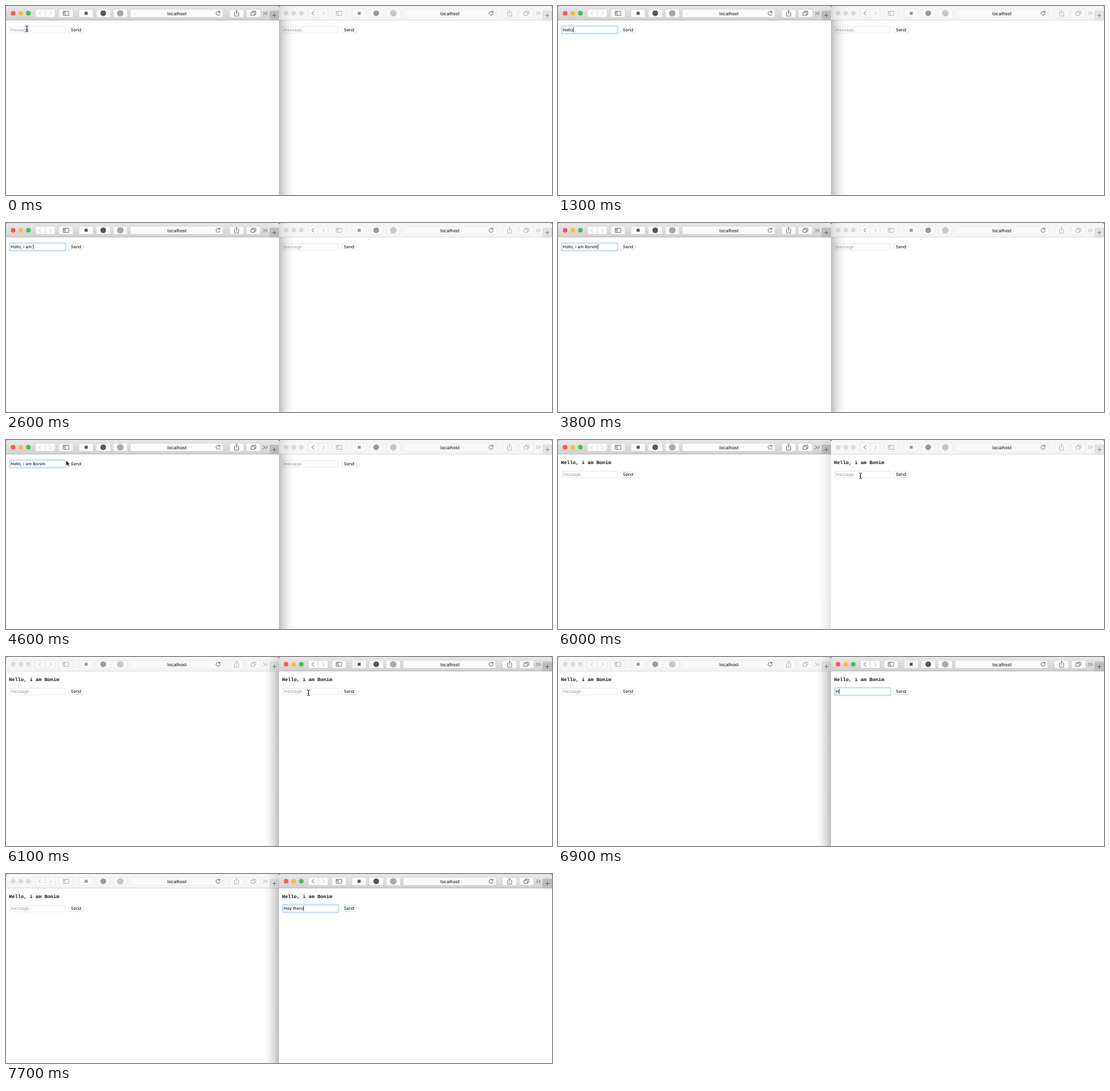
Recreate the animation shown at these times as an HTML page. Size 880 by 306 pixels, loop 8 s.

```html
<!DOCTYPE html>
<html lang="en">
<head>
<meta charset="utf-8">
<title>Two chat windows</title>
<style>
html, body { margin: 0; width: 100%; height: 100%; overflow: hidden; background: #fff; }
svg { display: block; width: 880px; height: 306px; }
text { font-family: Inter, "Liberation Sans", sans-serif; white-space: pre; text-rendering: geometricPrecision; }
.win {
  --bar: #f6f6f6; --edge: #d3d3d3; --btn: #f9f9f9; --rim: #e6e6e6; --icon: #a9a9a9;
  --off: #b9b9b9; --mark: #999; --soft: #c9c9c9; --tab: #e3e3e3; --plus: #777;
  --red: #dcdcdc; --amber: #dcdcdc; --green: #dcdcdc;
}
.win.active {
  --bar: url(#bar); --edge: #b4b4b4; --btn: #fbfbfb; --rim: #cfcfcf; --icon: #555;
  --off: #c3c3c3; --mark: #555; --soft: #a8a8a8; --tab: #bcbcbc; --plus: #555;
  --red: #fc5b57; --amber: #fdbc40; --green: #34c84a;
}
.btn { fill: var(--btn); stroke: var(--rim); stroke-width: .7; }
.icon { fill: none; stroke: var(--icon); stroke-width: .8; }
.dark { fill: none; stroke: #555; stroke-width: .9; }
.off { fill: none; stroke: var(--off); stroke-width: .9; }
.hint { fill: #9c9c9c; }
.log { font: bold 7.95px "Liberation Mono", monospace; fill: #111; }
</style>
</head>
<body>
<svg viewBox="0 0 880 306">
  <defs>
    <linearGradient id="bar" x2="0" y2="1">
      <stop stop-color="#e9e7e9"/><stop offset="1" stop-color="#d2d0d2"/>
    </linearGradient>
    <linearGradient id="shade">
      <stop stop-opacity=".26"/><stop offset=".3" stop-opacity=".14"/>
      <stop offset=".65" stop-opacity=".04"/><stop offset="1" stop-opacity="0"/>
    </linearGradient>
    <g id="cast">
      <rect width="25" height="23" fill="url(#shade)" opacity=".45"/>
      <rect y="23" width="25" height="283" fill="url(#shade)"/>
    </g>
    <path id="beamLine" d="M-2.2-4.6Q0-4.6 0-3.2Q0-4.6 2.2-4.6M0-3.4V3.4M-2.2 4.6Q0 4.6 0 3.2Q0 4.6 2.2 4.6M-1.2 1.2H1.2"/>
  </defs>
  <g id="stage"></g>
  <use id="castRight" href="#cast" x="440"/>
  <use id="castLeft" href="#cast" transform="translate(440 0) scale(-1 1)"/>
  <path id="arrow" d="M0 0V8.8L2 7 3.4 10 4.9 9.3 3.6 6.4H6.2Z" stroke="#fff" stroke-width=".7"/>
  <g id="beam" fill="none">
    <use href="#beamLine" stroke="#fff" stroke-width="2"/>
    <use href="#beamLine" stroke="#111"/>
  </g>
</svg>
<script>
const LOOP = 8000;
const GREETING = 'Hello, i am Bonim';
const REPLY = 'Hey there';
const $ = id => document.getElementById(id);

const button = (x, w) => `<rect class="btn" x="${x}" y="5.2" width="${w}" height="13.2" rx="2"/>`;
const light = (x, name) => `<circle cx="${x}" cy="11.7" r="3.75" style="fill:var(--${name})"/>`;

function windowMarkup(id, x, back, forward) {
  return `<g id="${id}" class="win" transform="translate(${x} 0)">
    <rect width="440" height="306" fill="#fff"/>
    <rect width="440" height="23" fill="#444"/>
    <path d="M0 23V2Q0 0 2 0H438Q440 0 440 2V23Z" style="fill:var(--bar)"/>
    <rect y="22.4" width="440" height=".8" style="fill:var(--edge)"/>
    ${light(11.5, 'red')}${light(23.8, 'amber')}${light(36, 'green')}
    ${button(47.4, 31.8)}
    <path class="btn" d="M63.4 5.2V18.4"/>
    <path class="${back}" d="M56.4 8.4L53 11.8L56.4 15.2"/>
    <path class="${forward}" d="M70 8.4L73.4 11.8L70 15.2"/>
    ${[85, 117.6, 145.3, 172.7, 360.2, 387.3].map(b => button(b, 23)).join('')}
    <path class="icon" d="M92.2 8.5H101V15.2H92.2ZM95.2 8.5V15.2M93 10.3H94.4M93 11.8H94.4"/>
    <rect x="126.8" y="9.4" width="4.8" height="4.8" style="fill:var(--mark)"/>
    <circle cx="156.7" cy="11.8" r="4.6" style="fill:var(--mark)"/>
    <circle cx="184.2" cy="11.8" r="5.3" style="fill:var(--soft)"/>
    ${button(200.2, 149.8)}
    <text x="275.5" y="14.5" font-size="7.3" text-anchor="middle">localhost</text>
    <path class="dark" d="M344.6 9.9A3.3 3.3 0 1 0 345.2 12.2M344.9 7.8V10.2H342.4"/>
    <path class="icon" d="M369.7 10.2H368.2V16.2H375V10.2H373.5M371.6 13.4V6.9M369.7 8.7L371.6 6.8L373.5 8.7"/>
    <path class="icon" d="M397.2 10.2V8.4H402.6V13.4H400.4M394.8 10.2H400.4V15.2H394.8Z"/>
    <path class="icon" style="stroke-width:1" d="M414.8 9.2L417.3 11.8L414.8 14.4M418.4 9.2L420.9 11.8L418.4 14.4"/>
    <path d="M425.3 23V8.2H440V23Z" style="fill:var(--tab);stroke:var(--edge);stroke-width:.6"/>
    <path d="M429.3 15.5H435.9M432.6 12.2V18.8" style="stroke:var(--plus);stroke-width:.8"/>
    <text class="log" x="4.8" y="38.9">${GREETING}</text>
    <g class="form">
      <rect class="ring" x="5.2" y="31.9" width="91.4" height="13.4" rx="1.8" fill="#dcedfd" stroke="#c3dffa" stroke-width="1.4"/>
      <rect class="field" x="6.6" y="33.3" width="88.6" height="10.6" fill="#fff" stroke="#dcdcdc" stroke-width=".7"/>
      <text class="hint" x="7.6" y="41" font-size="6.85">message...</text>
      <text class="value" x="7.6" y="41" font-size="6.85"></text>
      <rect class="caret" y="34.6" width=".8" height="8" fill="#111"/>
      <rect x="100.6" y="34.4" width="24.6" height="9.7" rx="2" fill="#d2d2d2"/>
      <rect x="100.6" y="33.8" width="24.6" height="9.7" rx="2" fill="#fff" stroke="#e2e2e2" stroke-width=".6"/>
      <text x="112.9" y="41" font-size="6.85" text-anchor="middle">Send</text>
    </g>
  </g>`;
}

$('stage').innerHTML = windowMarkup('left', 0, 'off', 'off') + windowMarkup('right', 440, 'dark', 'off');

// [time, value] steps; each value holds until the next step
const at = (steps, t) => {
  let value = steps[0][1];
  for (const [time, v] of steps) if (t >= time) value = v;
  return value;
};
const typed = (text, times, from = 0) => times.map((t, i) => [t, text.slice(0, from + i + 1)]);

const stem = GREETING.slice(0, 12);
const leftText = [
  [0, ''],
  ...typed(GREETING, [700, 900, 1000, 1100, 1300, 1500, 1700, 2000, 2300, 2400, 2500, 2600]),
  [2700, stem + 'bo'], [3000, stem + 'b'], [3200, stem],
  ...typed(GREETING, [3300, 3500, 3600, 3700, 3800], 12),
  [5100, '']
];
const rightText = [[0, ''], ...typed(REPLY, [...REPLY].map((_, i) => 6900 + i * 100))];
const leftRing = [[0, 0], [100, .4], [200, .75], [300, 1], [6000, 0]];
const rightRing = [[0, 0], [6200, .6], [6500, 1]];
const leftCaret = [[0, 0], [100, 1], [4300, 0], [4800, 1], [5400, 0], [5800, 1], [6000, 0]];
const rightCaret = [[0, 0], [6200, 1]];
const castRight = [[0, 1], [6000, 0]];
const castLeft = [[0, 0], [6000, .4], [6100, 1]];

// [time, shape, x, y]
const pointer = [
  [0, 'beam', 33.7, 37], [700, ''],
  [4200, 'arrow', 53, 31], [4300, 'arrow', 60, 27], [4400, 'arrow', 71, 25], [4500, 'arrow', 85, 28],
  [4600, 'arrow', 97, 33], [4700, 'arrow', 105, 37.5], [4800, 'arrow', 107.5, 39],
  [5400, 'arrow', 120, 43], [5500, 'arrow', 212, 56], [5600, 'arrow', 352, 61],
  [5700, 'beam', 458, 60], [5800, 'beam', 487.5, 58],
  [6900, '']
];

function updateWindow(id, text, ring, caret, active, sent) {
  const win = $(id), part = name => win.querySelector('.' + name);
  const value = part('value');
  win.classList.toggle('active', active);
  part('log').style.display = sent ? '' : 'none';
  part('form').setAttribute('transform', `translate(0 ${sent ? 17.2 : 0})`);
  part('ring').style.opacity = ring;
  part('field').style.stroke = ring ? '#b9d8f6' : '';
  if (value.textContent !== text) value.textContent = text;
  part('hint').style.display = text ? 'none' : '';
  part('caret').setAttribute('x', 7.8 + (text ? value.getComputedTextLength() : 0));
  part('caret').style.opacity = caret;
}

function render(t) {
  const sent = t >= 5100, swapped = t >= 6100;
  updateWindow('left', at(leftText, t), at(leftRing, t), at(leftCaret, t), !swapped, sent);
  updateWindow('right', at(rightText, t), at(rightRing, t), at(rightCaret, t), swapped, sent);
  $('castRight').style.opacity = at(castRight, t);
  $('castLeft').style.opacity = at(castLeft, t);
  const [, shape, x, y] = at(pointer.map(p => [p[0], p]), t);
  for (const id of ['arrow', 'beam']) {
    $(id).style.display = id === shape ? '' : 'none';
    if (id === shape) $(id).setAttribute('transform', `translate(${x} ${y})`);
  }
}

const start = performance.now();
function tick() {
  render((performance.now() - start) % LOOP);
  requestAnimationFrame(tick);
}
tick();
</script>
</body>
</html>
```
